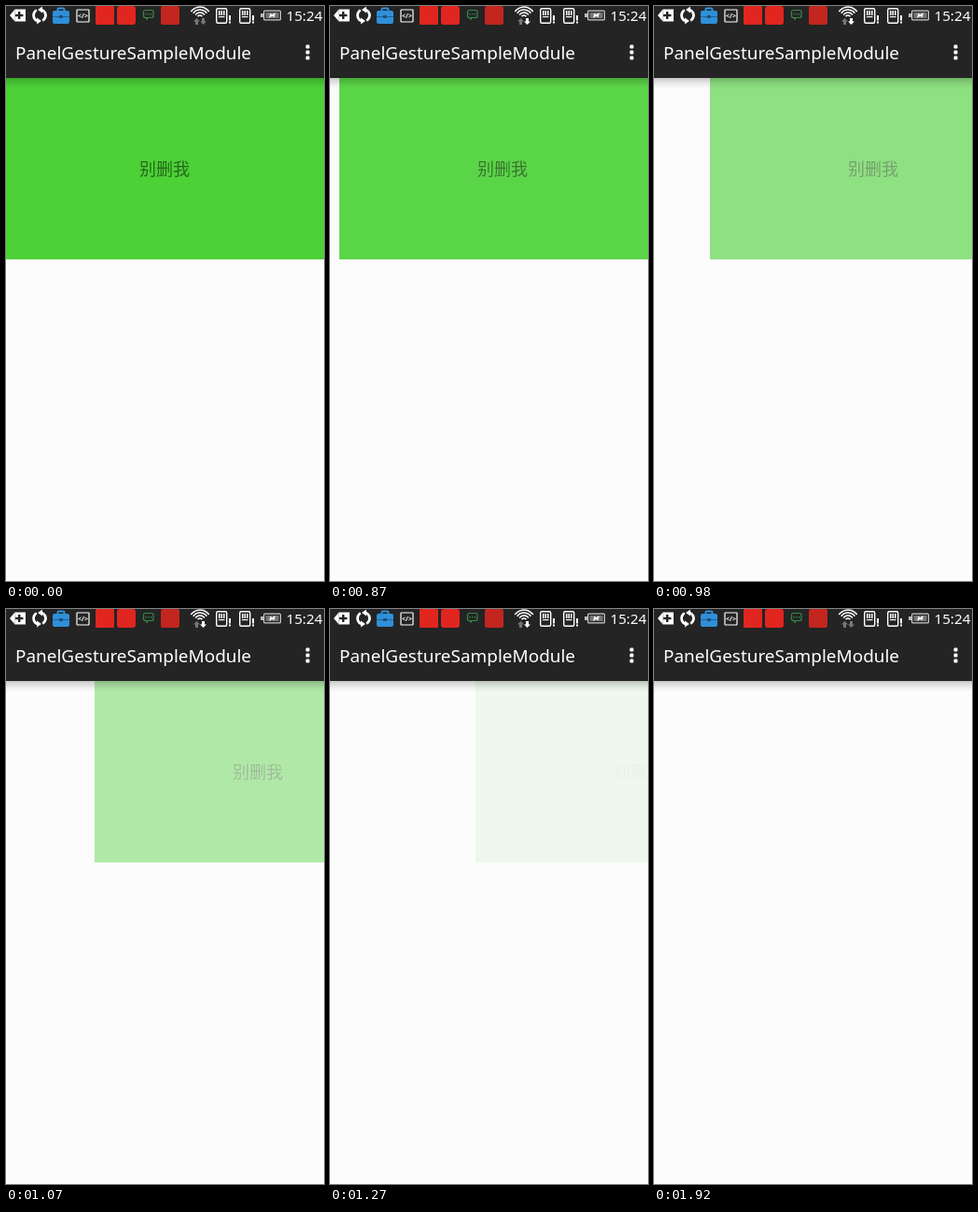
Write an HTML page with a canvas that moves like this. It is 341 by 615 pixels and loops after 2020 ms.

```html
<!DOCTYPE html>
<html lang="zh-CN">
<head>
<meta charset="utf-8">
<title>Swipe to dismiss</title>
<style>
html, body { margin: 0; width: 100%; height: 100%; overflow: hidden; background: #fcfcfc; }
canvas { display: block; }
</style>
</head>
<body>
<canvas id="stage" width="341" height="615"></canvas>
<script>
const ctx = document.getElementById('stage').getContext('2d');
const LOOP = 2020, W = 341, H = 615, BAR_H = 77;
const TOUCH = 780, DRAG = 870, RELEASE = 1270, GONE = 1730;
const BAR = '#242424', PAGE = '#fcfcfc', WHITE = '#fff', GREY = '#777';
const LATIN = '"Noto Sans", sans-serif';
const CJK = '"Noto Sans CJK SC", "Noto Sans CJK JP", sans-serif';

function rect(x, y, w, h, color) {
  ctx.fillStyle = color;
  ctx.fillRect(x, y, w, h);
}

function roundRect(x, y, w, h, r, color) {
  ctx.fillStyle = color;
  ctx.beginPath();
  ctx.roundRect(x, y, w, h, r);
  ctx.fill();
}

function frame(x, y, w, h, r, color, width) {
  ctx.strokeStyle = color;
  ctx.lineWidth = width;
  ctx.beginPath();
  ctx.roundRect(x, y, w, h, r);
  ctx.stroke();
}

function triangle(x, y, w, h, color) {
  ctx.fillStyle = color;
  ctx.beginPath();
  ctx.moveTo(x - w / 2, y);
  ctx.lineTo(x + w / 2, y);
  ctx.lineTo(x, y + h);
  ctx.fill();
}

function arc(x, y, r, from, to, color, width) {
  ctx.strokeStyle = color;
  ctx.lineWidth = width;
  ctx.beginPath();
  ctx.arc(x, y, r, from, to);
  ctx.stroke();
}

function text(str, x, y, font, color, align = 'left') {
  ctx.font = font;
  ctx.fillStyle = color;
  ctx.textAlign = align;
  ctx.fillText(str, x, y);
}

function turned(x, y, angle, paint) {
  ctx.save();
  ctx.translate(x, y);
  ctx.rotate(angle);
  paint();
  ctx.restore();
}

// The finger slows down slightly and is sampled in coarse, then fine steps.
function panelX(t) {
  if (t < DRAG) return -5;
  const u = Math.min(t, RELEASE) - 980;
  const step = u < 0 ? 55 : 30;
  const s = t >= RELEASE ? u : Math.floor(u / step) * step;
  return Math.round(60 + 0.42 * s - 0.000305 * s * s);
}

function drawPanel(t) {
  if (t >= GONE) return;
  const x = panelX(t);
  rect(x, BAR_H, 350, 194, '#4cd137');
  text('别删我', x + 175, 180.5, '18px ' + CJK, 'rgba(0,0,0,.5)', 'center');
  // Fade panel and label together by veiling them with the page colour.
  ctx.globalAlpha = (x + 5) / 175;
  rect(x, BAR_H, 350, 194, PAGE);
  ctx.globalAlpha = 1;
}

function drawShadow() {
  for (let i = 0; i < 12; i++) {
    rect(0, BAR_H + i, W, 1, `rgba(0,0,0,${0.2 * (1 - i / 12) ** 1.6})`);
  }
}

function drawTag() {
  turned(9.5, 10, Math.PI / 2, () => triangle(0, 0, 13, 5.5, WHITE));
  rect(9.5, 3.5, 11.5, 13, WHITE);
  rect(13, 6, 2.4, 8, BAR);
  rect(10, 8.8, 8.4, 2.4, BAR);
}

function drawSync() {
  for (const angle of [0, Math.PI]) {
    turned(36, 10, angle, () => {
      arc(0, 0, 6.5, -1.2, 1.05, WHITE, 2.8);
      turned(3, -6, Math.PI / 2, () => triangle(0, 0, 7, 5, WHITE));
    });
  }
}

function drawBriefcase() {
  const blue = '#2f90d9';
  frame(55.5, 2.5, 7, 4, 1, blue, 2);
  roundRect(50, 5, 18, 14, 2, blue);
  rect(50, 11, 18, 1, '#1d659d');
  rect(57, 10, 4, 3, '#1d4f7a');
}

function drawCode() {
  frame(76, 4, 13, 13, 0.5, WHITE, 1.2);
  text('</>', 82.5, 13, 'bold 7px ' + LATIN, WHITE, 'center');
}

function drawChat() {
  const green = '#348b46';
  frame(147.5, 4.5, 10.5, 8, 2, green, 1.2);
  triangle(151, 12.5, 3, 3, green);
  for (let i = 0; i < 3; i++) rect(149.5 + i * 2.7, 8, 1.3, 1.3, green);
}

function drawTraffic(x, angle, color) {
  turned(x, 16.5, angle, () => {
    rect(-1.5, -3.5, 3, 4, color);
    triangle(0, 0, 7, 3.5, color);
  });
}

function drawWifi(t) {
  for (let r = 3; r <= 12; r += 3) arc(208, 13, r, -Math.PI * 0.8, -Math.PI * 0.2, WHITE, 1.5);
  drawTraffic(204.5, Math.PI, GREY);
  drawTraffic(211.5, 0, t >= TOUCH && t < GONE ? WHITE : GREY);
}

function drawSim(x) {
  frame(x + 0.7, 2.7, 11, 15.6, 1.5, WHITE, 1.4);
  for (let i = 0; i < 3; i++) rect(x + 3 + i * 2.5, 5, 1.5, 5, WHITE);
  rect(x + 3, 11, 6.5, 1.2, WHITE);
  rect(x + 14, 10, 2, 5.5, WHITE);
  rect(x + 14, 16.5, 2, 2, WHITE);
}

function drawBattery() {
  rect(273, 8, 3, 4, '#bbb');
  frame(276.6, 5.1, 17.8, 9.8, 1, '#ccc', 1.2);
  rect(278.5, 7, 14, 6, GREY);
  for (const angle of [0, Math.PI]) {
    turned(285.5, 10, angle + 0.6, () => triangle(-1, -0.6, 4, 5, WHITE));
  }
}

function drawStatusBar(t) {
  drawTag();
  drawSync();
  drawBriefcase();
  drawCode();
  roundRect(96, 0, 20, 20, 1, '#e1251f');
  roundRect(119, 0, 20, 20, 3, '#e1251f');
  drawChat();
  roundRect(166, 0, 20, 20, 2, '#c2261f');
  drawWifi(t);
  drawSim(225);
  drawSim(250);
  drawBattery();
  text('15:24', 300.5, 16, '15.2px ' + LATIN, WHITE);
}

function drawTitleBar() {
  text('PanelGestureSampleModule', 10, 56.5, '18.95px ' + LATIN, WHITE);
  for (let i = 0; i < 3; i++) roundRect(321.5, 41.5 + i * 6, 4, 4, 1.2, WHITE);
}

function draw(t) {
  rect(0, 0, W, H, PAGE);
  drawPanel(t);
  drawShadow();
  rect(0, 0, W, BAR_H, BAR);
  drawStatusBar(t);
  drawTitleBar();
}

const start = performance.now();
function tick() {
  draw((performance.now() - start) % LOOP);
  requestAnimationFrame(tick);
}
tick();
</script>
</body>
</html>
```
